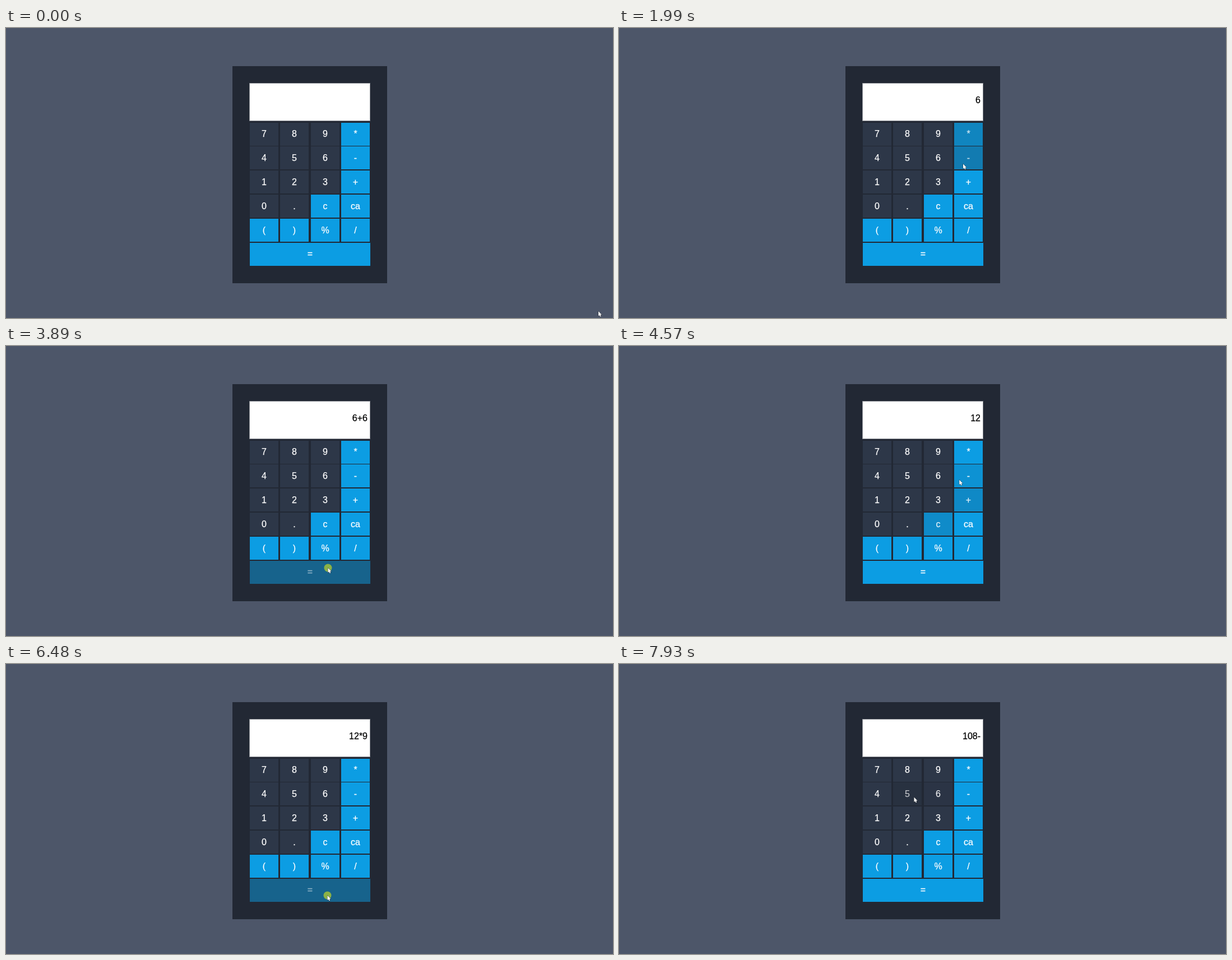
An HTML page with a canvas for the animation above (8000 ms loop, 1083 by 517 pixels).

```html
<!DOCTYPE html>
<html lang="en">
<head>
<meta charset="utf-8">
<title>Calculator</title>
<style>
  html, body { margin: 0; width: 100%; height: 100%; overflow: hidden; background: #4d5669; }
  canvas { display: block; }
</style>
</head>
<body>
<canvas id="stage" width="1083" height="517"></canvas>
<script>
const ctx = document.getElementById('stage').getContext('2d');
const LOOP = 8000, FADE = 200, PRESS = 130;
const SETTLE = 150, LINGER = 240;   // rest before and after each press
const HOME = { x: 1057, y: 505, leave: 40 };
const BLUE = '#0c9de3', DARK = '#2d3748';

const rows = ['7 8 9 *', '4 5 6 -', '1 2 3 +', '0 . c ca', '( ) % /', '='];
const keys = rows.flatMap((row, r) => row.split(' ').map((label, c) => {
  const top = 168.6 + 42.85 * r;
  return {
    label,
    x: Math.round(435 + 54.3 * c),
    y: Math.round(top),
    w: label === '=' ? 215 : 51,
    h: 41,
    baseline: Math.round(top + 25.5),
    color: r > 3 || c === 3 || label === 'c' ? BLUE : DARK
  };
}));

// Key, time, and where the pointer rests relative to the key's centre
const visit = (label, time, dx = 0, dy = 0, press = true) => {
  const key = keys.find(k => k.label === label);
  return {
    label, time, press,
    x: key.x + key.w / 2 + dx,
    y: key.y + key.h / 2 + dy,
    arrive: time - SETTLE,
    leave: time + LINGER
  };
};
const visits = [
  visit('6', 890, 5, -3),
  visit('*', 1550, -6, 10, false),
  visit('+', 2300, -12, -2),
  visit('6', 3030, 4, 15),
  visit('=', 3860, 32, -8),
  visit('*', 4940, -6),
  visit('9', 5550, 15, 15),
  visit('=', 6480, 31, 9),
  visit('-', 7400, -12),
  visit('5', 8000, 12, 6)
];
const presses = visits.filter(v => v.press);

const math = {
  '+': (a, b) => a + b,
  '-': (a, b) => a - b,
  '*': (a, b) => a * b
};

function enter(text, label) {
  if (label !== '=') return text + label;
  const [, a, op, b] = text.match(/(\d+)(\D)(\d+)/);
  return String(math[op](+a, +b));
}

function pointer(t) {
  const i = visits.findIndex(v => t < v.leave);
  const to = visits[i], from = visits[i - 1] || HOME;
  const u = Math.min(1, Math.max(0, (t - from.leave) / (to.arrive - from.leave)));
  const s = u * u * (3 - 2 * u);
  return [from.x + (to.x - from.x) * s, from.y + (to.y - from.y) * s];
}

// Share of the recent fade window spent over each key
function hoverLevels(t) {
  const levels = keys.map(() => 0), steps = 40;
  for (let i = 0; i < steps; i++) {
    const time = t - (i / steps) * FADE;
    if (time < 0) break;
    const [px, py] = pointer(time);
    const k = keys.findIndex(b => px >= b.x && px < b.x + b.w && py >= b.y && py < b.y + b.h);
    if (k >= 0) levels[k] += 1 / steps;
  }
  return levels;
}

function box(color, x, y, w, h) {
  ctx.fillStyle = color;
  ctx.fillRect(x, y, w, h);
}

function write(text, color, x, y, align) {
  ctx.font = '16px "Liberation Sans", Arial, sans-serif';
  ctx.textAlign = align;
  ctx.fillStyle = ctx.strokeStyle = color;
  ctx.lineWidth = 0.25;
  ctx.fillText(text, x, y);
  ctx.strokeText(text, x, y);
}

function drawKey(key, level) {
  ctx.globalAlpha = 1 - 0.5 * level;
  box(key.color, key.x, key.y, key.w, key.h);
  write(key.label, '#fff', key.x + key.w / 2, key.baseline, 'center');
  ctx.globalAlpha = 1;
}

function drawPointer(x, y, pressed) {
  if (pressed) {
    ctx.fillStyle = 'rgba(255, 255, 0, 0.5)';
    ctx.beginPath();
    ctx.arc(x, y, 7, 0, Math.PI * 2);
    ctx.fill();
  }
  const arrow = new Path2D('M0 0V8.6L1.9 6.9L3.2 9.8L4.7 9.1L3.5 6.3H6Z');
  ctx.save();
  ctx.translate(x, y);
  ctx.lineWidth = 0.8;
  ctx.strokeStyle = '#15181f';
  ctx.stroke(arrow);
  ctx.fillStyle = '#fff';
  ctx.fill(arrow);
  ctx.restore();
}

function draw(t) {
  box('#4d5669', 0, 0, 1083, 517);
  box('#222834', 404, 68, 276, 387);
  box('#888b92', 434, 98, 216, 68);
  box('#fff', 435, 99, 214, 66);

  const text = presses.filter(v => t >= v.time + PRESS).reduce((s, v) => enter(s, v.label), '');
  write(text, '#000', 645, 134, 'right');

  const levels = hoverLevels(t);
  keys.forEach((key, i) => drawKey(key, levels[i]));

  const pressed = presses.some(v => t >= v.time && t < v.time + PRESS);
  drawPointer(...pointer(t), pressed);
}

const start = performance.now();
function tick() {
  draw((performance.now() - start) % LOOP);
  requestAnimationFrame(tick);
}
tick();
</script>
</body>
</html>
```
